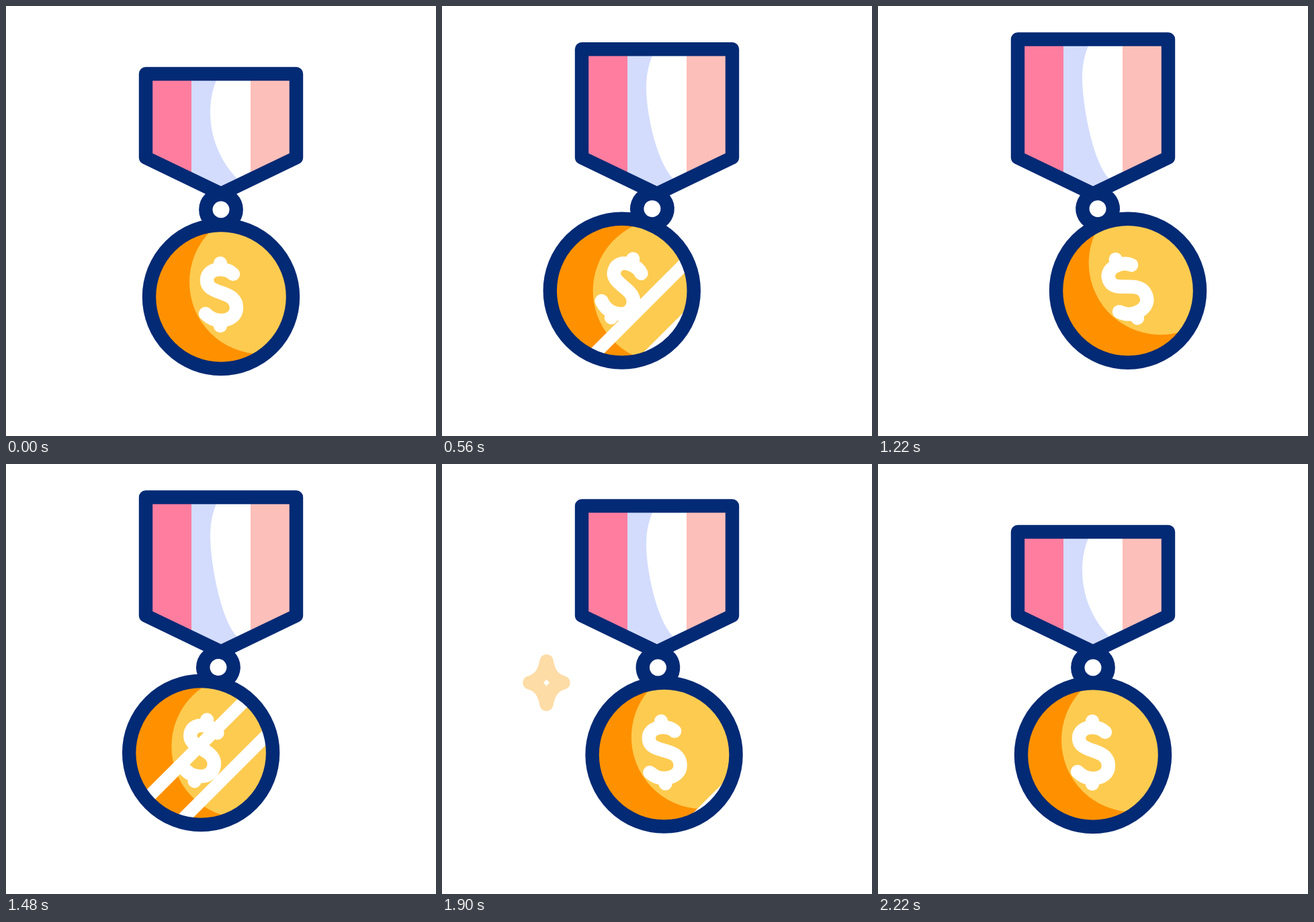
An HTML page with a canvas for the animation above (3.4 s loop, 640x640 px).

```html
<!DOCTYPE html>
<html lang="en">
<head>
<meta charset="utf-8">
<title>Medal</title>
<style>
  html, body { margin: 0; width: 100%; height: 100%; overflow: hidden; background: #fff; }
  canvas { display: block; width: 100vmin; height: 100vmin; }
</style>
</head>
<body>
<canvas id="stage" width="640" height="640"></canvas>
<script>
const ctx = document.getElementById('stage').getContext('2d');
const LOOP = 3400, STEP = 20, TAU = Math.PI * 2;
const NAVY = '#032a75', ORANGE = '#ff9100', GOLD = '#fdcb50', SPARK = '#febf5a';
const LINE = 20.4;

const PIVOT = { x: 320, y: 282.6 };
const RING = 20.4, COIN = 150.4;   // distances below the pivot

// Keys are [time, value] pairs.
const SWING = [[220, 0], [504, -28], [734, 27.1], [958, -26.2], [1170, 25.2],
  [1412, -23.6], [1612, 23.3], [1778, -22.3], [1993, 21.2], [2220, 0]];
const STRETCH = [[220, 0], [750, 1], [1740, 1], [2220, 0]];
const SHINE = [[220, 170], [560, 40], [880, -104], [1180, -260], [1240, -260],
  [1480, -26], [1900, 130], [2220, 170]];
const STARS = [{ x: 485.5, y: 523.5, start: 638 }, { x: 155.5, y: 325.5, start: 1790 }];
const STAR_RISE = 184, FADE_IN = 205, FADE_OUT = 100;

const linear = u => u;
const smooth = u => (1 - Math.cos(Math.PI * u)) / 2;

function track(keys, t, ease) {
  if (t <= keys[0][0]) return keys[0][1];
  for (let i = 1; i < keys.length; i++) {
    const [t0, a] = keys[i - 1], [t1, b] = keys[i];
    if (t <= t1) return a + (b - a) * ease((t - t0) / (t1 - t0));
  }
  return keys[keys.length - 1][1];
}

function disc(x, y, r) {
  ctx.beginPath();
  ctx.arc(x, y, r, 0, TAU);
}

function stroke(color, path) {
  ctx.strokeStyle = color;
  ctx.lineWidth = LINE;
  ctx.lineCap = ctx.lineJoin = 'round';
  path ? ctx.stroke(path) : ctx.stroke();
}

function fill(color) {
  ctx.fillStyle = color;
  ctx.fill();
}

function ribbon(lift) {
  const top = 101 - lift, inner = top + 10;
  const shape = new Path2D(`M208 ${top}H432V225.6L320 279.5L208 225.6Z`);
  ctx.save();
  ctx.clip(shape);
  const bar = (color, x, w) => {
    ctx.fillStyle = color;
    ctx.fillRect(x, top, w, 290 - top);
  };
  bar('#ff7d9f', 208, 68);
  bar('#d3dcfd', 276, 88);
  const bend = inner + 47;
  ctx.fillStyle = '#fff';
  ctx.fill(new Path2D(`M313 ${inner}C307 ${inner + 14} 304 ${inner + 30} 304 ${bend}
    C304 ${bend + 38} 319 231 344 257L364 280V${inner}Z`));
  bar('#fdbfb9', 364, 68);
  ctx.restore();
  stroke(NAVY, shape);
}

const DOLLAR = new Path2D(`M338 399C332 393 326 392 319 392C307 392 299 398 299 408
  C299 420 310 423 321 427C333 431 343 436 343 449C343 461 333 468 319 468
  C310 468 303 464 297 458M319 383V392M319 468V476`);

function swinging(angle, draw) {
  ctx.save();
  ctx.translate(PIVOT.x, PIVOT.y);
  ctx.rotate(-angle);
  ctx.translate(-PIVOT.x, -PIVOT.y);
  draw();
  ctx.restore();
}

function shine(x, y, offset) {
  ctx.save();
  disc(x, y, 107);
  ctx.clip();
  ctx.translate(x, y);
  ctx.rotate(Math.PI / 4);
  ctx.fillStyle = '#fff';
  for (const gap of [0, 84]) {
    ctx.fillRect((offset + gap) / Math.SQRT2, -120, 19, 240);
  }
  ctx.restore();
}

function medal(angle, offset) {
  const x = PIVOT.x + COIN * Math.sin(angle);
  const y = PIVOT.y + COIN * Math.cos(angle);
  swinging(angle, () => {
    disc(320, PIVOT.y + RING, 22.7);
    fill('#fff');
    stroke(NAVY);
    disc(320, 433, 107);
    fill(ORANGE);
    ctx.save();
    ctx.clip();
    disc(380, 411, 107);
    fill(GOLD);
    ctx.restore();
    stroke('#fff', DOLLAR);
  });
  shine(x, y, offset);
  disc(x, y, 107);
  stroke(NAVY);
}

function star({ x, y, start }, t) {
  const age = t - start, left = 2 * STAR_RISE - age;
  if (age <= 0 || left <= 0) return;
  const s = smooth(age / STAR_RISE);
  const corner = (a, b, c, d, e, f) =>
    ctx.bezierCurveTo(a * s, b * s, c * s, d * s, e * s, f * s);
  ctx.save();
  ctx.translate(x, y);
  ctx.globalAlpha = Math.min(1, age / FADE_IN, left / FADE_OUT);
  ctx.beginPath();
  ctx.moveTo(0, -49 * s);
  corner(5, -20, 17, -6, 38.5, 0);
  corner(17, 6, 5, 20, 0, 49);
  corner(-5, 20, -17, 6, -38.5, 0);
  corner(-17, -6, -5, -20, 0, -49);
  ctx.closePath();
  stroke(SPARK);
  ctx.restore();
}

function draw(t) {
  ctx.fillStyle = '#fff';
  ctx.fillRect(0, 0, 640, 640);
  ribbon(51.5 * track(STRETCH, t, smooth));
  medal(track(SWING, t, smooth) * Math.PI / 180, track(SHINE, t, linear));
  for (const s of STARS) star(s, t);
}

const begin = performance.now();
function tick() {
  const t = (performance.now() - begin) % LOOP;
  draw(Math.floor(t / STEP) * STEP);
  requestAnimationFrame(tick);
}
tick();
</script>
</body>
</html>
```
